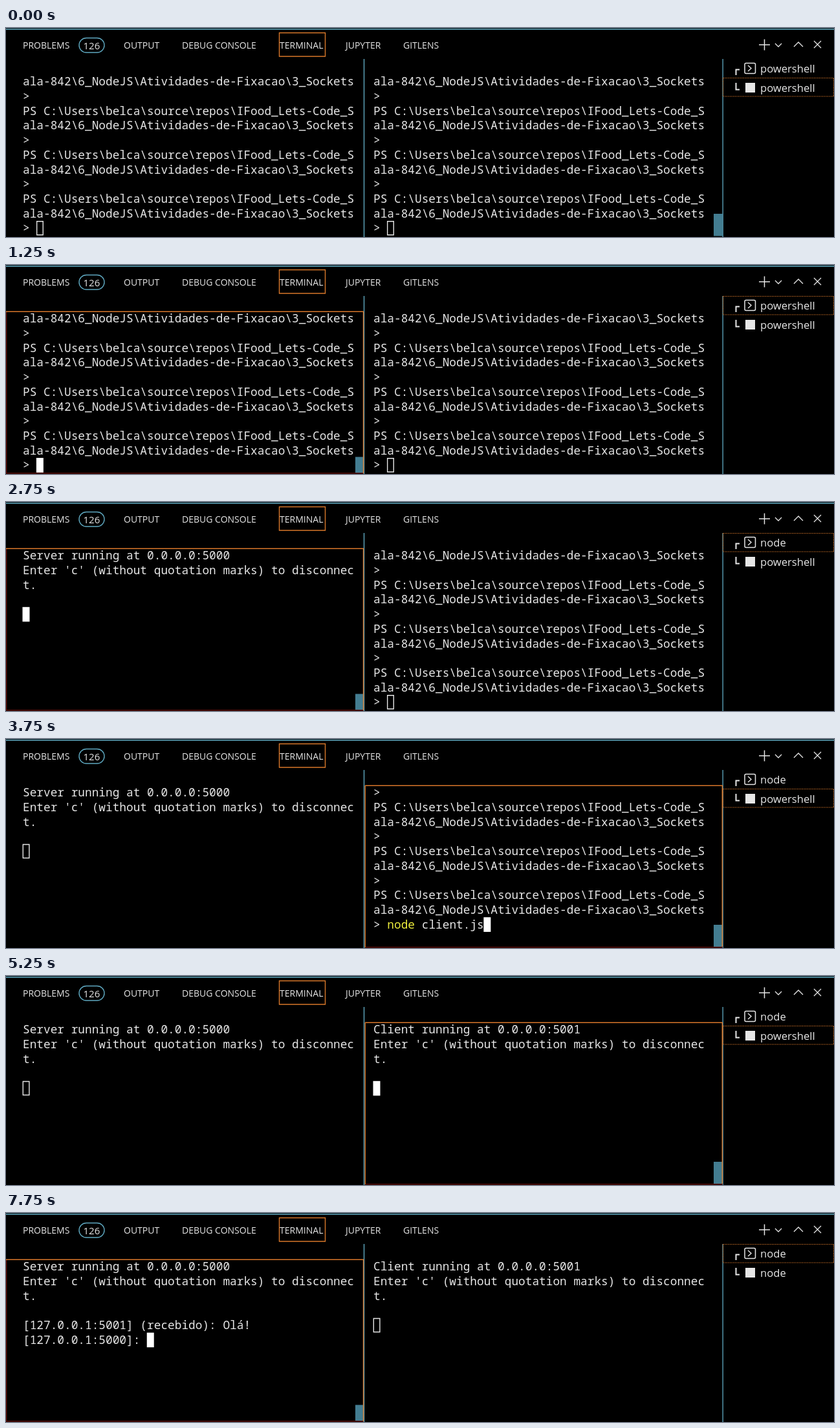
Recreate the animation shown at these times as an HTML page with a canvas. Size 1280 by 324 pixels, loop 8000 ms.

```html
<!DOCTYPE html>
<html lang="en">
<head>
<meta charset="utf-8">
<title>Terminal panel</title>
<style>
html, body { margin: 0; width: 100%; height: 100%; overflow: hidden; background: #000; }
canvas { display: block; }
</style>
</head>
<body>
<canvas id="stage" width="1280" height="324"></canvas>
<script>
const ctx = document.getElementById('stage').getContext('2d');
const LOOP = 8000, STEP = 250;
const COL = 10.68, ROW = 22.7, TOP = 72;
const LEFT_X = 26, RIGHT_X = 568;
const TEAL = '#5fa9c1', ORANGE = '#d8772a', DARK_RED = '#5a0c08';
const SLIDER = '#437d91', TEXT = '#e6e6e6', YELLOW = '#ecec3c', WHITE = '#fff';
const MONO = '17.8px "Noto Sans Mono", monospace';
const SANS = '"Open Sans", sans-serif';

const PATH = ['PS C:\\Users\\belca\\source\\repos\\IFood_Lets-Code_S',
              'ala-842\\6_NodeJS\\Atividades-de-Fixacao\\3_Sockets', '>'];
const HISTORY = [...PATH.slice(1), ...PATH, ...PATH, ...PATH];
const HELP = ["Enter 'c' (without quotation marks) to disconnec", 't.', ''];
const SERVER = ['Server running at 0.0.0.0:5000', ...HELP];
const CLIENT = ['Client running at 0.0.0.0:5001', ...HELP];
const CHAT = ['[127.0.0.1:5001] (recebido): Olá!', '[127.0.0.1:5000]:'];

function text(str, x, y, font, color = TEXT) {
  ctx.font = font;
  ctx.fillStyle = color;
  ctx.fillText(str, x, y);
}

function line(points, color = TEXT, width = 1.3) {
  ctx.strokeStyle = color;
  ctx.lineWidth = width;
  ctx.beginPath();
  points.forEach(([x, y], i) => i ? ctx.lineTo(x, y) : ctx.moveTo(x, y));
  ctx.stroke();
}

function fill(x, y, w, h, color) {
  ctx.fillStyle = color;
  ctx.fillRect(x, y, w, h);
}

function frame(x, y, w, h, color, width = 1.3, radius = 0) {
  ctx.strokeStyle = color;
  ctx.lineWidth = width;
  ctx.beginPath();
  ctx.roundRect(x, y, w, h, radius);
  ctx.stroke();
}

function drawHeader() {
  fill(0, 1, 1280, 1.6, TEAL);
  const tabs = [['PROBLEMS', 26], ['OUTPUT', 182], ['DEBUG CONSOLE', 272],
                ['TERMINAL', 423], ['JUPYTER', 525], ['GITLENS', 614]];
  for (const [name, x] of tabs) text(name, x, 31.5, '14px ' + SANS);
  frame(113, 15.5, 39, 22.5, TEAL, 1.4, 11.2);
  text('126', 119.5, 32.5, '15px ' + SANS);
  frame(422.5, 7.5, 71, 36.5, ORANGE, 1.4);

  line([[1164, 26], [1181, 26]], TEXT, 1.5);
  line([[1172.5, 17.5], [1172.5, 34.5]], TEXT, 1.5);
  line([[1189, 24], [1194, 29], [1199, 24]]);
  line([[1218, 29], [1225, 22], [1232, 29]]);
  line([[1249, 20], [1260, 31]]);
  line([[1249, 31], [1260, 20]]);
}

function drawList(s) {
  fill(1107.5, 48, 1.3, 276, TEAL);
  line([[1134, 64.5], [1128.5, 64.5], [1128.5, 73]], TEXT, 2);
  line([[1128.5, 85], [1128.5, 95.5], [1134, 95.5]], TEXT, 2);
  frame(1142, 54.5, 16.5, 16, TEXT, 1.5, 2);
  line([[1147, 58], [1152, 62.5], [1147, 67]], TEXT, 1.4);
  fill(1143, 85, 15, 15, TEXT);
  text(s.labels[0], 1166, 68.5, '16.6px ' + SANS);
  text(s.labels[1], 1166, 98.5, '16.6px ' + SANS);
  ctx.setLineDash([1.3, 1.3]);
  frame(1108.5, s.selected ? 77.5 : 48.5, 171, 28.5, ORANGE, 1.2);
  ctx.setLineDash([]);
}

function drawFocus(x1, x2, sideX, outerX, outerColor) {
  fill(outerX, TOP, 1.4, 251, outerColor);
  fill(x1, 322, x2 - x1, 1.4, DARK_RED);
  fill(x1, TOP - 0.5, x2 - x1, 1.5, ORANGE);
  fill(sideX, TOP, 1.4, 251, ORANGE);
}

function drawPane(x, pane, focused) {
  pane.lines.forEach((str, i) => text(str, x, TOP + i * ROW + 17.3, MONO));
  if (pane.command) {
    const y = TOP + (pane.lines.length - 1) * ROW + 17.3;
    text(pane.command.slice(0, 4), x + 2 * COL, y, MONO, YELLOW);
    text(pane.command.slice(4), x + 6 * COL, y, MONO);
  }
  const [col, row] = pane.cursor;
  const cx = x + col * COL, cy = TOP + row * ROW;
  if (focused) fill(cx - 0.5, cy, 11, 22.7, WHITE);
  else frame(cx + 0.3, cy + 0.7, 9.6, 21, TEXT, 1.4);
}

// A shell pane holds the prompt history, optionally scrolled up by one row.
function shell(command = '', scroll = 0, entered = false) {
  return {
    lines: HISTORY.slice(scroll), command,
    cursor: entered ? [0, 10] : [2 + command.length, 10 - scroll]
  };
}

function output(lines, typed = '') {
  return { lines: [...lines, typed], cursor: [typed.length, lines.length] };
}

function leftPane(t) {
  if (t < 1500) return shell();
  if (t < 1750) return shell('node se');
  if (t < 2000) return shell('node server.js');
  if (t < 2250) return shell('node server.js', 1, true);
  if (t < 6250) return output(SERVER);
  return { lines: [...SERVER, ...CHAT], cursor: [18, 5] };
}

function rightPane(t) {
  if (t < 3500) return shell();
  if (t < 3750) return shell('node client.js');
  if (t < 4000) return shell('node client.js', 1);
  if (t < 4250) return shell('node client.js', 1, true);
  const typed = t < 5500 || t >= 6250 ? 0 : t < 5750 ? 1 : t < 6000 ? 3 : 4;
  return output(CLIENT, 'Olá!'.slice(0, typed));
}

function stateAt(t) {
  const focus = t < 500 ? '' : t < 3250 || t >= 7000 ? 'left' : 'right';
  return {
    focus,
    selected: focus === 'left' ? 0 : 1,
    labels: [t < 2500 ? 'powershell' : 'node', t < 5500 ? 'powershell' : 'node'],
    leftBar: (t >= 500 && t < 3250) || t >= 5750,
    rightBar: t < 500 || (t >= 3250 && t < 7250)
  };
}

function draw(t) {
  const s = stateAt(t);
  fill(0, 0, 1280, 324, '#000');
  drawHeader();
  fill(552.8, 48, 1.4, 276, TEAL);
  drawList(s);
  if (s.leftBar) fill(540, 297.5, 12.5, 25, SLIDER);
  if (s.rightBar) fill(1094, 288, 14, 34.5, SLIDER);
  if (s.focus === 'left') drawFocus(0, 553, 551.8, 0, DARK_RED);
  if (s.focus === 'right') drawFocus(555, 1108, 554.6, 1106.6, ORANGE);
  drawPane(LEFT_X, leftPane(t), s.focus === 'left');
  drawPane(RIGHT_X, rightPane(t), s.focus === 'right');
}

const start = performance.now();
function tick() {
  const t = (performance.now() - start) % LOOP;
  draw(Math.floor(t / STEP) * STEP);
  requestAnimationFrame(tick);
}
tick();
</script>
</body>
</html>
```
